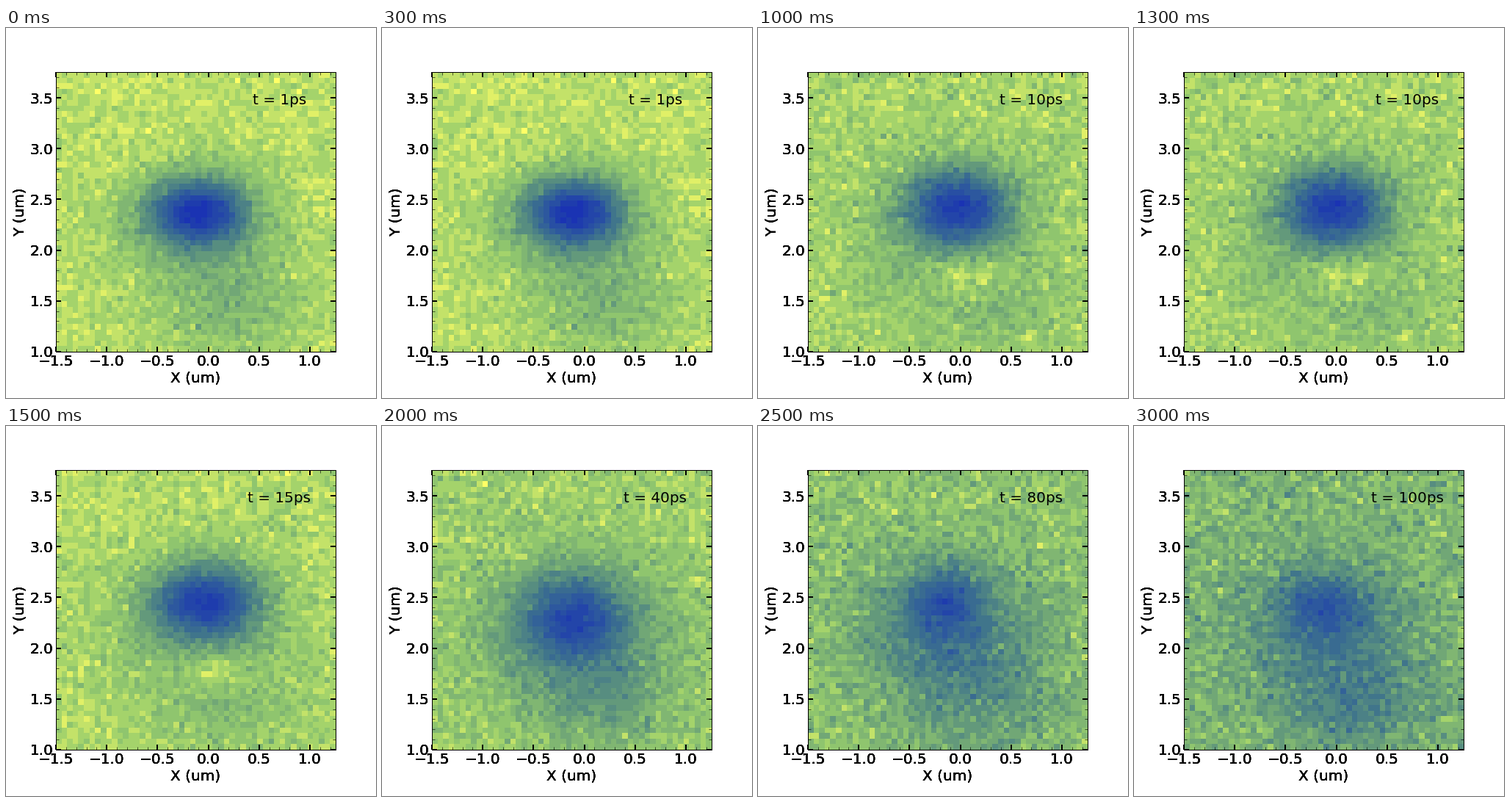
These frames come from a looping animation (504x504 px, 3.5 s). A matplotlib script:

```python
import numpy as np
import matplotlib.pyplot as plt
from matplotlib.animation import FuncAnimation
from matplotlib.colors import LinearSegmentedColormap
from matplotlib.ticker import MultipleLocator

CELLS = 50
EXTENT = (-1.5, 1.25, 1.0, 3.75)

plt.rcParams.update({"font.size": 20, "font.family": "DejaVu Sans"})

blue_yellow = LinearSegmentedColormap.from_list("blue_yellow", [
    "#1a33b3", "#2a53a2", "#3e738d", "#669c7a", "#99ce6c", "#ffff66"], N=18)

# time (ps), background, core x, y, width, height,
# then the strengths of core, halo, lower patch and pale spot
SCANS = [
    (1, .85, -.10, 2.37, .34, .235, -.72, -.12, -.13, 0),
    (5, .81, -.02, 2.43, .36, .24, -.66, -.14, -.10, .10),
    (10, .81, -.02, 2.43, .34, .25, -.60, -.15, -.07, .18),
    (15, .83, -.02, 2.46, .36, .25, -.62, -.15, -.09, .16),
    (40, .79, -.10, 2.30, .32, .27, -.40, -.28, -.13, 0),
    (80, .74, -.17, 2.45, .25, .23, -.32, -.28, -.13, 0),
    (100, .70, -.12, 2.42, .30, .23, -.28, -.22, -.17, 0),
]


def centers(low, high):
    step = (high - low) / CELLS
    return low + step * (np.arange(CELLS) + .5)


X, Y = np.meshgrid(centers(*EXTENT[:2]), centers(*EXTENT[2:]))


def bump(x, y, w, h):
    return np.exp(-((X - x) / w) ** 2 / 2 - ((Y - y) / h) ** 2 / 2)


HALO = bump(-.1, 2.15, .62, .5)
PATCH = bump(.25, 1.42, .5, .35)
PALE = bump(.06, 1.76, .28, .15)


def scan_image(index):
    _, level, x, y, w, h, core, halo, patch, pale = SCANS[index]
    field = (level + core * bump(x, y, w, h) + halo * HALO
             + patch * PATCH + pale * PALE)
    # Dimmer scans are noisier, and the dark core is quieter
    noise = .04 + .17 * (.85 - level)
    rng = np.random.default_rng(40 + index)
    field += noise * (1 + field / level) / 2 * rng.standard_normal(X.shape)
    return np.clip(field, 0, 1)


def style(ax):
    ax.set(xlim=EXTENT[:2], ylim=EXTENT[2:], aspect="equal",
           xlabel="X (um)", ylabel="Y (um)")
    for axis in (ax.xaxis, ax.yaxis):
        axis.set_major_locator(MultipleLocator(.5))
    ax.tick_params(direction="in", length=7, width=2, top=True, right=True)


fig = plt.figure(figsize=(7, 7), dpi=72)
fig.subplots_adjust(left=.125, right=.9, bottom=.125, top=.88)

ax = fig.add_subplot()
image = ax.imshow(scan_image(0), cmap=blue_yellow, vmin=0, vmax=1,
                  origin="lower", extent=EXTENT, interpolation="nearest")
style(ax)
for axis in (ax.xaxis, ax.yaxis):
    axis.set_minor_locator(MultipleLocator(.1))
ax.tick_params(which="minor", direction="in", length=4, width=.6,
               top=True, right=True)

# Stacked empty axes give the labels and frame their heavy edges
for _ in range(4):
    top = fig.add_subplot()
    top.patch.set_visible(False)
    style(top)

label = top.text(.8, .9, "", transform=top.transAxes, ha="center", va="center")


def update(index):
    image.set_data(scan_image(index))
    label.set_text(f"t = {SCANS[index][0]}ps")
    return image, label


anim = FuncAnimation(fig, update, frames=len(SCANS), interval=500,
                     repeat=True, repeat_delay=0)
plt.show()
```
